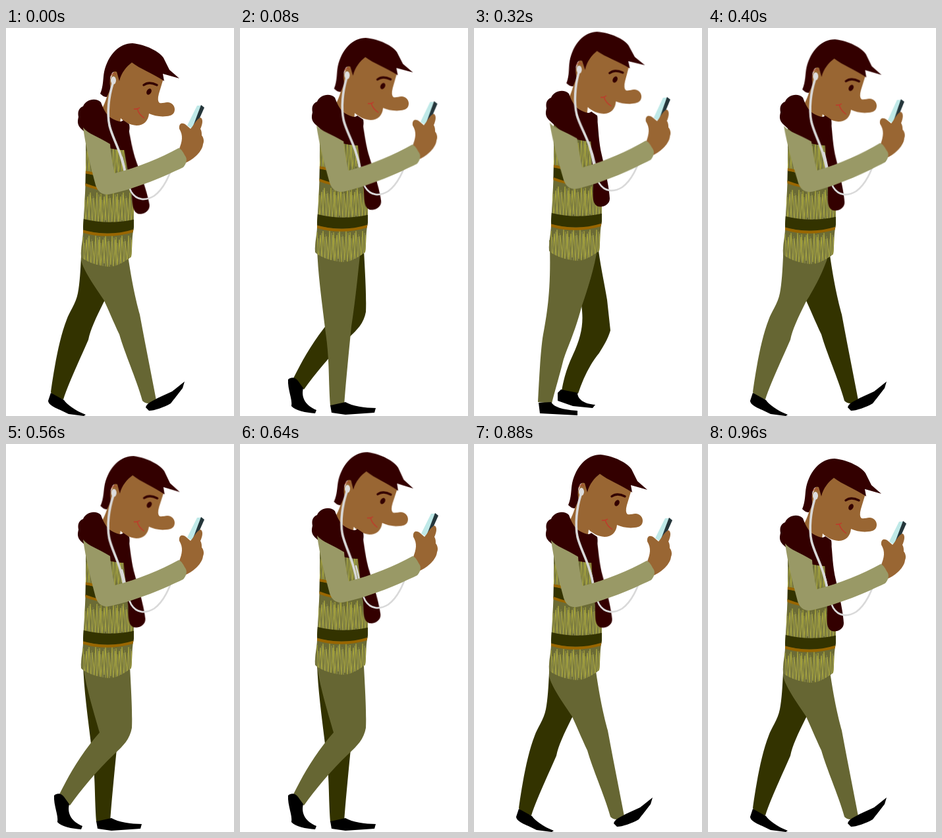
An HTML page without scripts for the animation above (1.04 s loop, 346 by 585 pixels).

```html
<!DOCTYPE html>
<html lang="en">
<head>
<meta charset="utf-8">
<title>Walking with a phone</title>
<style>
html, body { margin: 0; height: 100%; overflow: hidden; background: #fff; }
svg { display: block; width: 100vw; height: 100vh; }

.skin { fill: #963; }
.wool { fill: #300; }
.near { color: #663; }
.far { color: #330; }
.cord { fill: none; stroke: #d9d9d9; stroke-linecap: round; }

.head, .torso, .scarf, .tail, .arm, .pose { animation: 1040ms step-end infinite; }
.head { animation-name: nod; transform-origin: 180px 120px; }
.torso { animation-name: bob; }
.scarf { animation-name: lift; }
.tail { animation-name: swing; transform-origin: 180px 165px; }
.arm { animation-name: hold; transform-origin: 160px 235px; }

/* Leg poses are held for two 80 ms steps, the first one for three. */
.pose { visibility: hidden; animation-name: show; animation-delay: calc((var(--at) - 13) * 80ms); }
.long { animation-name: show-long; }
@keyframes show { 0% { visibility: visible } 15.3846%, 100% { visibility: hidden } }
@keyframes show-long { 0% { visibility: visible } 23.0769%, 100% { visibility: hidden } }

@keyframes nod {
  0%, 100% { transform: none }
  7.69% { transform: translate(0, -8px) rotate(-.7deg) }
  15.38% { transform: translate(-2px, -17px) rotate(-1.5deg) }
  23.07% { transform: translate(-2px, -21px) rotate(-2deg) }
  30.76% { transform: translate(-2px, -17px) rotate(-2deg) }
  38.46% { transform: translate(0, -6px) rotate(.5deg) }
  46.15% { transform: none }
  53.84% { transform: translate(0, -5px) rotate(1deg) }
  61.53% { transform: translate(-1px, -11px) rotate(1.5deg) }
  69.23% { transform: translate(-1px, -19px) }
  76.92% { transform: translate(-2px, -15px) rotate(-.7deg) }
  84.61% { transform: translate(0, -7px) }
  92.3% { transform: translate(0, -1px) }
}
@keyframes bob {
  0%, 46.15%, 92.3%, 100% { transform: none }
  7.69%, 53.84% { transform: translateY(-7px) }
  15.38%, 23.07%, 61.53%, 69.23% { transform: translateY(-12px) }
  30.76%, 76.92% { transform: translateY(-9px) }
  38.46%, 84.61% { transform: translateY(-4px) }
}
@keyframes lift {
  0%, 46.15%, 92.3%, 100% { transform: none }
  7.69% { transform: translateY(-7px) }
  15.38% { transform: translateY(-14px) }
  23.07% { transform: translateY(-16px) }
  30.76% { transform: translateY(-13px) }
  38.46% { transform: translateY(-7px) }
  53.84% { transform: translateY(-5px) }
  61.53%, 76.92% { transform: translateY(-11px) }
  69.23% { transform: translateY(-14px) }
  84.61% { transform: translateY(-5px) }
}
@keyframes swing {
  0%, 100% { transform: rotate(-6.5deg) }
  7.69% { transform: rotate(-4.5deg) }
  15.38% { transform: rotate(-2deg) }
  23.07%, 38.46% { transform: rotate(-.7deg) }
  30.76%, 92.3% { transform: none }
  46.15%, 84.61% { transform: rotate(-2deg) }
  53.84% { transform: rotate(-3deg) }
  61.53%, 69.23%, 76.92% { transform: rotate(-4deg) }
}
@keyframes hold {
  0%, 46.15%, 92.3%, 100% { transform: none }
  7.69% { transform: translateY(-4px) rotate(-.7deg) }
  15.38%, 30.76% { transform: translateY(-8.5px) rotate(-1.5deg) }
  23.07% { transform: translateY(-11px) rotate(-1.5deg) }
  38.46% { transform: translate(1px, -4px) rotate(-2deg) }
  53.84% { transform: translateY(-6px) }
  61.53%, 69.23% { transform: translateY(-12px) }
  76.92% { transform: translateY(-10px) }
  84.61% { transform: translateY(-5px) }
}
</style>
</head>
<body>
<svg viewBox="0 0 346 585" preserveAspectRatio="none">
  <defs>
    <g id="front">
      <path fill="currentColor" d="M114 335H184C190 380 197 410 203 432C212 480 222 530 228 561C220 568 212 567 207 562C198 530 180 490 172 462C163 443 155 424 149 411C135 390 118 367 114 350Z"/>
      <path d="M212 572C214 565 222 563 230 558L252 548L271 533L268 543L250 566C240 572 225 577 217 577Z"/>
    </g>
    <g id="back">
      <path fill="currentColor" d="M114 335H185C177 365 160 395 148 414C136 438 128 455 125 470C112 500 95 535 87 560C80 559 72 556 68 549C72 520 80 470 92 440C96 428 106 416 109 400C112 385 113 365 114 345Z"/>
      <path d="M68 550L88 561C92 567 105 577 121 583L118 585L95 582C82 575 64 570 64 562Z"/>
    </g>
    <g id="stand">
      <path fill="currentColor" d="M116 318L184 325C180 360 176 405 169 450C165 490 160 540 158 570H137C134 530 136 500 130 460C124 410 118 370 117 330Z"/>
      <path d="M137 569L160 564C170 570 190 573 206 573L204 580L160 583L139 580Z"/>
    </g>
    <g id="bent">
      <path fill="currentColor" d="M117 318H187C190 370 192 405 191 428C188 445 178 455 165 467C140 490 115 520 97 545L80 530C95 500 115 465 142 435C135 410 122 370 117 335Z"/>
      <path d="M73 530C77 526 84 526 88 532L96 543C93 555 97 568 116 576L114 581C100 580 84 577 78 570C80 560 72 545 73 530Z"/>
    </g>
    <g id="push">
      <path fill="currentColor" d="M114 320L188 328C183 362 172 395 163 421C153 460 140 485 135 503C128 530 122 550 118 566L97 564C99 525 101 490 104 468C110 435 117 400 115 330Z"/>
      <path d="M98 565L117 564C122 573 140 576 157 577V584L100 581Z"/>
    </g>
    <g id="pass">
      <path fill="currentColor" d="M122 320L190 326C194 360 202 402 205 433C203 450 198 460 190 472C175 495 163 530 152 552L124 543C130 515 142 480 163 437C150 405 133 370 122 335Z"/>
      <path d="M123 542C128 538 135 541 137 545L152 552C158 562 168 568 179 572L176 577L150 568L122 556Z"/>
    </g>
    <g id="reach">
      <path fill="currentColor" d="M130 320L188 326C190 350 198 385 202 410L207 456C203 470 196 480 190 490C175 508 165 530 158 551L133 547C137 525 142 510 150 493C163 465 167 445 163 418Z"/>
      <path d="M127 550L132 545L157 550C157 560 168 567 184 568L180 573L150 570L127 562Z"/>
    </g>
    <path id="tuft" fill="none" d="M0 4l2 44l3-40l2 36l2-42l3 47l2-39l3 36l2-44l2 48l3-42l1 36"/>
    <g id="fringe">
      <g stroke="#a7a53c" stroke-width="1.2">
        <use href="#tuft"/><use href="#tuft" x="25"/><use href="#tuft" x="50"/>
      </g>
      <g stroke="#8c8c50" stroke-width=".8">
        <use href="#tuft" x="-12" y="3"/><use href="#tuft" x="13" y="3"/><use href="#tuft" x="38" y="3"/><use href="#tuft" x="63" y="3"/>
      </g>
    </g>
    <path id="tunic" d="M121 150H180C180 185 189 225 194 260V300C190 320 192 335 190 345C180 352 170 360 155 360C135 358 118 350 114 345C113 330 118 315 117 300C119 270 121 240 121 210Z"/>
    <clipPath id="cut"><use href="#tunic"/></clipPath>
  </defs>

  <g class="pose long" style="--at:11"><use href="#back" class="far"/><use href="#front" class="near"/></g>
  <g class="pose" style="--at:1"><use href="#bent" class="far"/><use href="#stand" class="near"/></g>
  <g class="pose" style="--at:3"><use href="#reach" class="far"/><use href="#push" class="near"/></g>
  <g class="pose" style="--at:5"><use href="#front" class="far"/><use href="#back" class="near"/></g>
  <g class="pose" style="--at:7"><use href="#stand" class="far"/><use href="#bent" class="near"/></g>
  <g class="pose" style="--at:9"><use href="#push" class="far"/><use href="#pass" class="near"/></g>

  <g class="torso">
    <use href="#tunic" fill="#6b6b35"/>
    <g clip-path="url(#cut)">
      <use href="#fringe" x="119" y="172"/>
      <use href="#fringe" x="119" y="246"/>
      <use href="#fringe" x="117" y="311"/>
      <path fill="none" stroke="#330" stroke-width="17" d="M115 296Q155 306 196 297"/>
      <path fill="none" stroke="#960" stroke-width="4" d="M115 306Q155 318 196 305"/>
      <path fill="none" stroke="#330" stroke-width="17" d="M118 226Q145 236 160 236"/>
      <path fill="none" stroke="#960" stroke-width="4" d="M118 217Q140 221 160 223M118 235Q130 241 160 246"/>
    </g>
  </g>

  <g class="scarf">
    <path class="wool tail" d="M162 150H187C189 165 189 185 194 205C201 235 205 255 206 270C206 280 195 284 188 282C180 278 180 270 181 250L177 180Z"/>
    <path class="cord" stroke-width="2.6" d="M176 195C182 215 183 235 190 247C198 260 212 261 225 253C243 240 250 215 258 195L268 172"/>
  </g>

  <g class="head">
    <path class="skin" d="M188 48L239 76L232 99Q229 110 233 113C237 114 241 112 245 112C259 113 259 130 249 132C238 135 226 133 217 129C216 140 209 147 198 147C188 146 180 142 174 136L172 152L144 145V125C152 110 156 98 156 82L165 62Z"/>
    <path class="wool" d="M143 99C148 88 147 76 149 66C155 40 172 23 192 23C213 25 233 36 239 45L248 63L263 76L238 69L240 80C222 68 204 62 191 52C183 58 175 67 172 80L168 66C158 62 156 82 159 91L153 104C149 104 146 102 143 99Z"/>
    <path fill="none" stroke="#c0392b" stroke-width="1.3" d="M194 122Q199 123 203 120M199 121Q201 130 210 136"/>
    <path fill="none" stroke="#a8442a" stroke-width="1.2" d="M159 72Q163 65 167 71"/>
    <path fill="none" stroke="#300" stroke-width="3.4" stroke-linecap="round" d="M209 86Q217 80 229 86"/>
    <ellipse class="wool" cx="217" cy="96" rx="3.4" ry="5" transform="rotate(30 217 96)"/>
  </g>

  <path class="wool scarf" d="M114 152C107 145 109 139 110 134C108 125 112 120 117 118C121 108 136 104 144 112C148 122 151 130 160 136C168 140 174 143 178 139L187 145C189 155 185 160 183 164L180 184C168 184 152 182 136 172Z"/>

  <g class="head">
    <path class="cord" stroke-width="3.6" d="M162 84C156 103 153 128 157 147C162 168 175 184 182 224"/>
    <ellipse cx="163" cy="79" rx="4" ry="6" fill="#ddd"/>
  </g>

  <g class="arm">
    <path fill="#bfe9e8" d="M290 117L298 117L284 153L275 147Z"/>
    <path fill="#25363b" d="M296 116L301 120L288 149L282 153Z"/>
    <path class="skin" d="M262 185C268 170 269 162 263 152C262 143 268 142 273 146L280 152C284 148 289 137 295 135C300 137 298 146 295 152C297 155 297 159 297 162C300 165 301 171 299 175C298 186 285 198 273 203Z"/>
    <path fill="#996" d="M117 150C125 160 139 163 158 175C159 190 162 206 165 219C200 210 235 196 262 181C267 183 269 188 272 193C276 198 273 206 269 210C240 224 200 241 160 250C148 253 140 249 136 237C129 210 121 180 117 150Z"/>
  </g>
</svg>
</body>
</html>
```
